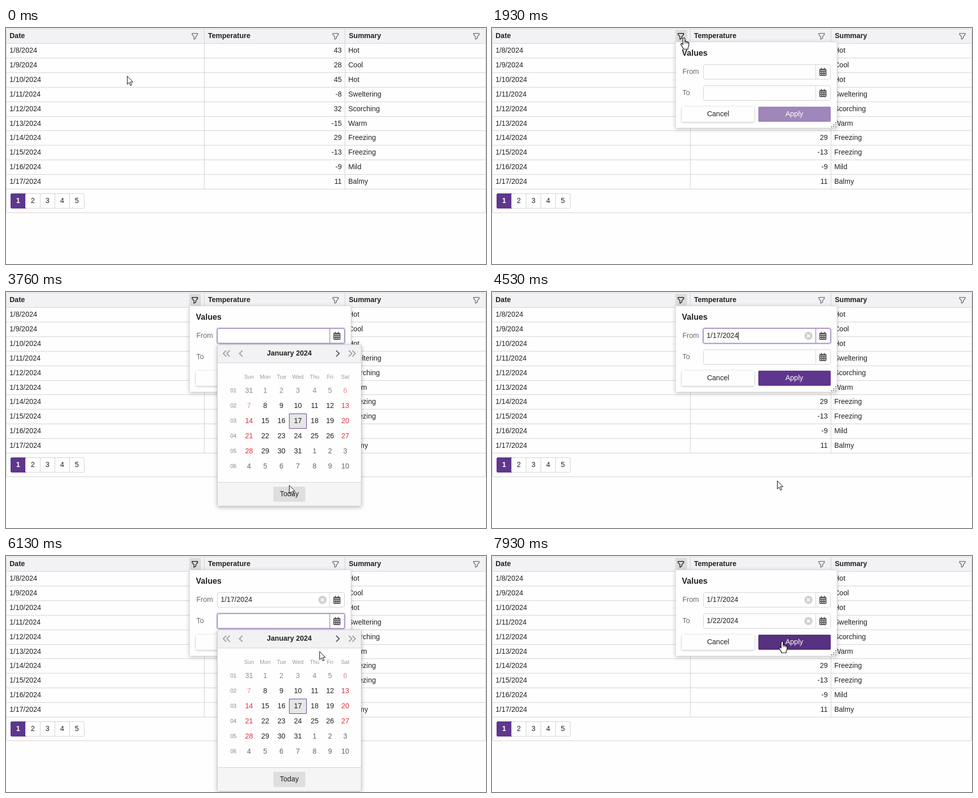
These frames come from a looping animation (948x468 px, 8 s). An HTML page with a canvas:

```html
<!DOCTYPE html>
<html lang="en">
<head>
<meta charset="utf-8">
<title>Date range filter</title>
<style>
html, body { margin: 0; width: 100%; height: 100%; overflow: hidden; background: #fefefe; }
canvas { display: block; }
</style>
</head>
<body>
<canvas id="stage" width="948" height="468"></canvas>
<script>
const ctx = document.getElementById('stage').getContext('2d');
const LOOP = 8000;
const INK = '#212121', LINE = '#d1d1d1', PURPLE = '#5f368d', WHITE = '#fefefe';

const ROWS = [[43, 'Hot'], [28, 'Cool'], [45, 'Hot'], [-8, 'Sweltering'], [32, 'Scorching'],
  [-15, 'Warm'], [29, 'Freezing'], [-13, 'Freezing'], [-9, 'Mild'], [11, 'Balmy']];
const DAYS = ['Sun', 'Mon', 'Tue', 'Wed', 'Thu', 'Fri', 'Sat'];
const DAY_X = [480, 512, 544, 576.5, 609.5, 640, 670];

// Pointer moves: start, end, from x, y, to x, y
const MOVES = [
  [500, 1160, 239, 95, 373, 19],
  [1930, 2660, 379, 19, 645, 82],
  [3130, 3900, 645, 82, 556.5, 390],
  [4330, 5130, 556.5, 390, 659, 141],
  [5160, 5230, 659, 141, 659, 137],
  [5800, 6600, 659, 137, 519, 322],
  [7200, 7930, 519, 322, 573, 169]
];

const within = (t, a, b) => t >= a && t < b;
const ease = p => p < .5 ? 4 * p ** 3 : 1 - 4 * (1 - p) ** 3;

function pointerAt(t) {
  let pos = { x: 239, y: 95 };
  for (const [a, b, x0, y0, x1, y1] of MOVES) {
    if (t < a) break;
    const k = ease(Math.min(1, (t - a) / (b - a)));
    pos = { x: Math.round(x0 + (x1 - x0) * k), y: Math.round(y0 + (y1 - y0) * k) };
  }
  return pos;
}

function stateAt(t) {
  const s = {
    t, ...pointerAt(t),
    popup: t >= 1530,
    from: t >= 4160 ? '1/17/2024' : '',
    to: t >= 6760 ? '1/22/2024' : '',
    calendar: within(t, 2830, 4160) ? 0 : within(t, 5430, 6760) ? 42 : null,
    focus: '', caret: false
  };
  const spans = [[2800, 4000, 'from'], [4160, 5400, 'from'], [5400, 6600, 'to'], [6760, 7930, 'to']];
  for (const [a, b, name] of spans) {
    if (within(t, a, b)) {
      s.focus = name;
      s.caret = Math.floor((t - a) / 530) % 2 === 0;
    }
  }
  s.hover = hit(s);
  return s;
}

function inside(s, x, y, w, h) {
  return s.x >= x && s.x < x + w && s.y >= y && s.y < y + h;
}

// Names the control under the pointer
function hit(s) {
  if (s.calendar !== null && inside(s, 417, 104 + s.calendar, 285, 321)) {
    const y = s.calendar;
    if (inside(s, 528, 386 + y, 63, 30)) return 'today';
    if (inside(s, 645, 108 + y, 52, 28)) return 'next';
    for (let i = 8; i < 42; i++) {
      const cx = DAY_X[i % 7], cy = 195 + y + 30 * Math.floor(i / 7);
      if (inside(s, cx - 16, cy - 14, 32, 29)) return 'day' + i;
    }
    return '';
  }
  if (s.popup && inside(s, 362, 27, 320, 172)) {
    for (const [name, y] of [['from', 72], ['to', 114]]) {
      if (inside(s, 640, y, 29, 30)) return name + 'Button';
      if (s[name] && inside(s, 616, y, 20, 30)) return name + 'Clear';
      if (inside(s, 417, y, 222, 30)) return name + 'Text';
    }
    if (inside(s, 526, 156, 143, 30)) return s.from ? 'apply' : '';
    if (inside(s, 375, 156, 143, 30)) return 'cancel';
    return '';
  }
  return inside(s, 362, 4, 23, 23) ? 'filter' : '';
}

function text(str, x, y, { size = 14, bold = false, color = INK, align = 'left' } = {}) {
  ctx.font = `${bold ? 'bold ' : ''}${size}px "Liberation Sans", Arial, sans-serif`;
  ctx.fillStyle = color;
  ctx.textAlign = align;
  ctx.fillText(str, x, y);
}

function rect(x, y, w, h, color) {
  ctx.fillStyle = color;
  ctx.fillRect(x, y, w, h);
}

function box(x, y, w, h, r, fill, stroke) {
  ctx.beginPath();
  ctx.roundRect(x, y, w, h, r);
  if (fill) { ctx.fillStyle = fill; ctx.fill(); }
  if (stroke) { ctx.strokeStyle = stroke; ctx.lineWidth = 1; ctx.stroke(); }
}

function shadowBox(x, y, w, h, r, fill, blur, alpha, dy) {
  ctx.save();
  ctx.shadowColor = `rgba(0,0,0,${alpha})`;
  ctx.shadowBlur = blur;
  ctx.shadowOffsetY = dy;
  box(x, y, w, h, r, fill);
  ctx.restore();
}

function line(points, color, width) {
  ctx.beginPath();
  points.forEach(([x, y], i) => i ? ctx.lineTo(x, y) : ctx.moveTo(x, y));
  ctx.strokeStyle = color;
  ctx.lineWidth = width;
  ctx.stroke();
}

function path(d, x, y, fill, stroke, width) {
  const p = new Path2D(d);
  ctx.save();
  ctx.translate(x, y);
  ctx.lineJoin = 'round';
  if (fill) { ctx.fillStyle = fill; ctx.fill(p); }
  if (stroke) { ctx.strokeStyle = stroke; ctx.lineWidth = width; ctx.stroke(p); }
  ctx.restore();
}

function filterIcon(x, active) {
  if (active) box(x - 11, 4, 23, 23, 2, '#dcdcdd');
  path('M-5.5 -5.3H5.5V-3L1.8 1.2V4.4L-1.8 6.3V1.2L-5.5 -3Z', x, 16, null, active ? INK : '#74747c', 1.5);
}

function drawGrid(s) {
  rect(0, 0, 948, 468, WHITE);
  box(.5, 1.5, 947, 365, 2.5, WHITE, LINE);
  rect(1, 2, 946, 28, '#f2f2f5');
  [['Date', 7, 373], ['Temperature', 399, 651], ['Summary', 677, 929]].forEach(([name, x, icon], i) => {
    text(name, x, 20, { bold: true });
    filterIcon(icon, i === 0 && (s.popup || s.hover === 'filter'));
  });
  for (let i = 0; i <= 10; i++) rect(1, Math.round(30 + 28.9 * i), 946, 1, LINE);
  for (const x of [391, 669]) rect(x, 2, 1, 317, LINE);
  ROWS.forEach(([temp, summary], i) => {
    const y = Math.round(30 + 28.9 * i) + 19;
    text(`1/${8 + i}/2024`, 7, y);
    text(temp, 663, y, { align: 'right' });
    text(summary, 676, y);
  });
  box(9.5, 328.5, 145, 29, 2.5, WHITE, LINE);
  box(9, 328, 30, 30, [3, 0, 0, 3], PURPLE);
  for (let i = 0; i < 5; i++) {
    const on = i === 0;
    if (i) rect(38 + 29 * (i - 1), 329, 1, 28, on ? PURPLE : LINE);
    text(i + 1, 24 + 29 * i, 347, { align: 'center', bold: on, color: on ? '#fff' : INK });
  }
}

function calendarIcon(x, y) {
  const c = '#56565c';
  box(x - 7, y - 6, 14, 14, 2, c);
  rect(x - 4, y - 8, 2, 3, c);
  rect(x + 2, y - 8, 2, 3, c);
  rect(x - 5.5, y - 3, 11, 1, WHITE);
  for (let r = 0; r < 2; r++) {
    for (let i = 0; i < 3; i++) rect(x - 5 + 4 * i, y + 4 * r, 2, 2, WHITE);
  }
}

function drawInput(s, name, label, y) {
  const focused = s.focus === name;
  const edge = focused ? '#8a6bad' : LINE;
  text(label, 376, y + 19, { color: '#6a6a70' });
  if (focused) box(415, y - 2, 256, 34, 5, '#d8cde5');
  box(417.5, y + .5, 251, 29, 3, WHITE, edge);
  if (s.hover === name + 'Button') rect(640, y + 1, 28, 28, '#eeeef0');
  rect(639, y + 1, 1, 28, edge);
  calendarIcon(653.5, y + 15);
  const value = s[name];
  if (value) {
    text(value, 424, y + 19);
    ctx.beginPath();
    ctx.arc(625, y + 15, 8, 0, Math.PI * 2);
    ctx.fillStyle = s.hover === name + 'Clear' ? '#a8a8a8' : '#cfcfcf';
    ctx.fill();
    line([[622, y + 12], [628, y + 18]], '#fff', 2);
    line([[628, y + 12], [622, y + 18]], '#fff', 2);
  }
  if (focused && s.caret) rect(value ? 486 : 424, y + 7, 1, 16, '#000');
}

function drawPopup(s) {
  shadowBox(362, 27, 320, 172, 2, WHITE, 8, .2, 2);
  box(362.5, 27.5, 319, 171, 2, WHITE, '#d4d4d4');
  text('Values', 375, 55, { size: 16, bold: true });
  drawInput(s, s.focus === 'to' ? 'from' : 'to', s.focus === 'to' ? 'From' : 'To', s.focus === 'to' ? 72 : 114);
  drawInput(s, s.focus === 'to' ? 'to' : 'from', s.focus === 'to' ? 'To' : 'From', s.focus === 'to' ? 114 : 72);
  shadowBox(375, 156, 143, 30, 2, s.hover === 'cancel' ? '#f0f0f0' : WHITE, 4, .25, 1);
  text('Cancel', 446.5, 175, { align: 'center' });
  box(526, 156, 143, 30, 2, !s.from ? '#9f86bb' : s.hover === 'apply' ? '#56317f' : PURPLE);
  text('Apply', 597, 175, { align: 'center', color: '#fff' });
  for (let r = 0; r < 3; r++) {
    for (let i = 0; i <= r; i++) rect(678 - 4 * i, 187 + 4 * r, 2, 2, '#77777d');
  }
}

function chevron(x, dir, color) {
  line([[x - 3 * dir, 116], [x + 3 * dir, 122], [x - 3 * dir, 128]], color, 2);
}

function drawCalendar(s) {
  ctx.save();
  ctx.translate(0, s.calendar);
  shadowBox(417, 104, 285, 321, 2, WHITE, 9, .28, 2);
  box(417.5, 104.5, 284, 320, 2, WHITE, '#cdcdcd');
  rect(418, 105, 283, 35, '#f2f2f5');
  rect(418, 140, 283, 1, LINE);
  rect(418, 377, 283, 1, LINE);
  rect(418, 378, 283, 46, '#f5f5f5');
  text('January 2024', 559.5, 126, { bold: true, align: 'center' });
  for (const x of [432, 439, 464]) chevron(x, -1, '#a0a0a4');
  chevron(655, 1, '#5a5a60');
  for (const x of [680, 687]) chevron(x, 1, '#a0a0a4');

  DAYS.forEach((d, i) => text(d, DAY_X[i], 172, { size: 11, color: '#999', align: 'center' }));
  for (let w = 0; w < 6; w++) {
    text('0' + (w + 1), 449, 199 + 30 * w, { size: 11, color: '#858585', align: 'center' });
  }
  for (let i = 0; i < 42; i++) {
    const col = i % 7, x = DAY_X[col], y = 195 + 30 * Math.floor(i / 7);
    const day = i === 0 ? 31 : i > 31 ? i - 31 : i;
    const hovered = s.hover === 'day' + i;
    if (i === 17) box(559.5, 241.5, 34, 29, 0, hovered ? '#dcdcdc' : '#e6e6e6', PURPLE);
    else if (hovered) rect(x - 16, y - 14, 32, 29, '#e9e9e9');
    const red = i <= 31 && (col === 0 || col === 6);
    let color = red ? '#e03040' : INK;
    if (i < 8) color = red && i ? '#ee8f92' : '#8b8b8b';
    if (i > 31) color = '#666';
    text(day, x, y + 5, { color, align: 'center' });
  }
  box(528, 386, 63, 30, 2, s.hover === 'today' ? '#d2d2d2' : '#dedede');
  text('Today', 559.5, 405, { align: 'center' });
  ctx.restore();
}

function pointerKind(s) {
  // The shape lingers after a calendar closes, until the next move.
  if (within(s.t, 4160, 4330) || within(s.t, 6760, 7200)) return 'hand';
  if (s.hover.endsWith('Text')) return 'beam';
  return s.hover ? 'hand' : 'arrow';
}

function drawPointer(s) {
  const kind = pointerKind(s);
  if (kind === 'hand') {
    path('M-2 1.6Q0 -.6 2 1.6V7.6Q3.6 6.6 4.8 8.2Q6.5 7.4 7.5 9.2Q9.6 8.8 9.8 11.2V15Q9.6 18 8 20V23H-1.5V20.8Q-4 17.5 -6 13.8Q-6.4 11.5 -4.4 11.6Q-3 12 -2 14Z',
      s.x, s.y, '#fff', '#000', 1.2);
    path('M2 7.5V11.5M4.8 8.5V11.8M7.5 9.4V12.2', s.x, s.y, null, '#000', 1);
  } else if (kind === 'beam') {
    path('M-3 -8H-1L0 -7L1 -8H3M0 -7V7M-3 8H-1L0 7L1 8H3', s.x + .5, s.y, null, '#000', 1);
  } else {
    path('M0 0V16L3.7 12.6L6.3 18.5L8.8 17.4L6.2 11.6H11.3Z', s.x + .5, s.y + .5, '#fff', '#000', 1);
  }
}

function frame(now) {
  const s = stateAt(now % LOOP);
  drawGrid(s);
  if (s.popup) drawPopup(s);
  if (s.calendar !== null) drawCalendar(s);
  drawPointer(s);
}

const start = performance.now();
function tick() {
  frame(performance.now() - start);
  requestAnimationFrame(tick);
}
tick();
</script>
</body>
</html>
```
